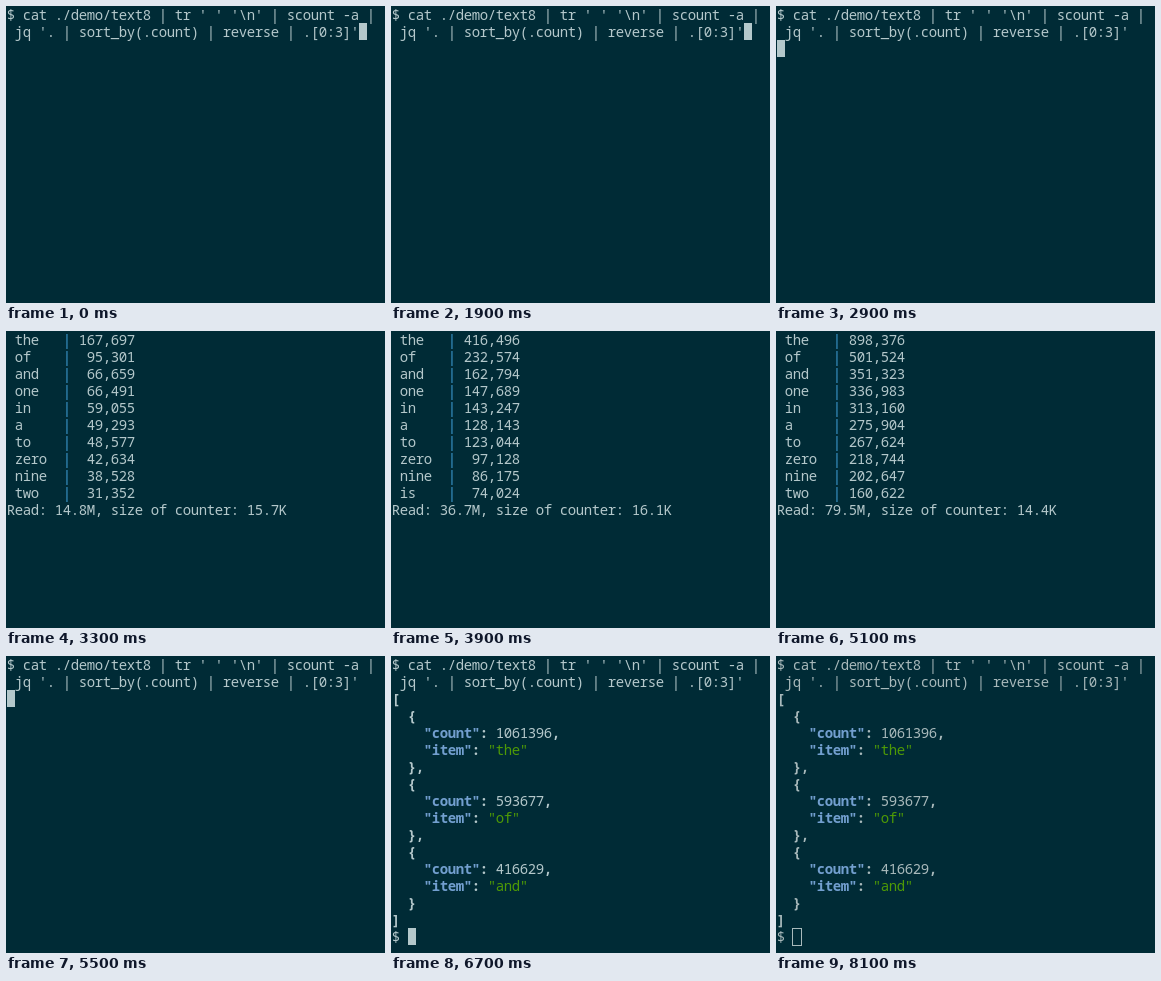
Write an HTML page with a canvas that moves like this. It is 379 by 297 pixels and loops after 8.2 s.

```html
<!DOCTYPE html>
<html lang="en">
<head>
<meta charset="utf-8">
<title>Word counter in a terminal</title>
<style>
  html, body { margin: 0; width: 100%; height: 100%; overflow: hidden; background: #002b36; }
  canvas { display: block; }
</style>
</head>
<body>
<canvas id="screen" width="379" height="297"></canvas>
<script>
const ctx = document.getElementById('screen').getContext('2d');
const LOOP = 8200, CELL_W = 8, CELL_H = 17, LEFT = 1, BASELINE = 14;
const BG = '#002b36', FG = '#b4c8cb', FG_DIM = '#a8b9bb';
const BLUE = '#729fcf', GREEN = '#4e9a06', BAR = '#3f9fd8';

const COMMAND = [
  "$ cat ./demo/text8 | tr ' ' '\\n' | scount -a |",
  " jq '. | sort_by(.count) | reverse | .[0:3]'"
];
const RESULT = [[1061396, 'the'], [593677, 'of'], [416629, 'and']];

// Values at each of KEY_TIMES; linear in between.
const KEY_TIMES = [2900, 3300, 3900, 4700, 5500];
const COUNTS = {
  the:  [0, 167697, 416496, 735355, 1061396],
  of:   [0, 95301, 232574, 409370, 593677],
  and:  [0, 66659, 162794, 286017, 416629],
  one:  [0, 66491, 147689, 262201, 411764],
  in:   [0, 59055, 143247, 254119, 372201],
  a:    [0, 49293, 128143, 225934, 325873],
  to:   [0, 48577, 123044, 218872, 316376],
  zero: [0, 42634, 97128, 172512, 264975],
  nine: [0, 38528, 86175, 154863, 250430],
  two:  [0, 31352, 73300, 128600, 192644],
  is:   [0, 30300, 74024, 129400, 183153]
};
const MEGS_READ = [0.2, 14.8, 36.7, 65.1, 94];
const COUNTER_SIZE = [14.9, 15.7, 16.1, 13.9, 15];

let foreground = FG;

function valueAt(values, t) {
  let i = 0;
  while (i < KEY_TIMES.length - 2 && t >= KEY_TIMES[i + 1]) i++;
  const part = (t - KEY_TIMES[i]) / (KEY_TIMES[i + 1] - KEY_TIMES[i]);
  return values[i] + (values[i + 1] - values[i]) * part;
}

function print(col, row, text, color = foreground, bold = false) {
  ctx.font = `${bold ? 'bold ' : ''}14px "Noto Sans Mono", "DejaVu Sans Mono", monospace`;
  ctx.fillStyle = color;
  [...text].forEach((char, i) =>
    ctx.fillText(char, LEFT + (col + i + 0.5) * CELL_W, row * CELL_H + BASELINE));
  return col + text.length;
}

function cursor(col, row) {
  ctx.fillStyle = FG;
  ctx.fillRect(LEFT + col * CELL_W, row * CELL_H, CELL_W, CELL_H);
}

function hollowCursor(col, row) {
  ctx.strokeStyle = foreground;
  ctx.lineWidth = 1;
  ctx.strokeRect(LEFT + col * CELL_W - 0.5, row * CELL_H + 0.5, CELL_W + 1, CELL_H);
}

function drawCommand() {
  COMMAND.forEach((line, row) => print(0, row, line));
}

function drawTable(t) {
  Object.entries(COUNTS)
    .map(([word, values]) => [word, Math.round(valueAt(values, t))])
    .sort((a, b) => b[1] - a[1])
    .slice(0, 10)
    .forEach(([word, count], row) => {
      print(1, row, word);
      print(7, row, '|', BAR);
      print(9, row, count.toLocaleString('en-US').padStart(7));
    });
  const read = valueAt(MEGS_READ, t).toFixed(1);
  const size = valueAt(COUNTER_SIZE, t).toFixed(1);
  print(0, 10, `Read: ${read}M, size of counter: ${size}K`);
}

function drawField(row, key, value, color, tail) {
  let col = print(4, row, `"${key}"`, BLUE, true);
  col = print(col, row, ':', foreground, true);
  col = print(col + 1, row, value, color);
  print(col, row, tail, foreground, true);
}

function drawResult() {
  print(0, 2, '[', foreground, true);
  RESULT.forEach(([count, item], i) => {
    const row = 3 + i * 4;
    print(2, row, '{', foreground, true);
    drawField(row + 1, 'count', String(count), foreground, ',');
    drawField(row + 2, 'item', `"${item}"`, GREEN, '');
    print(2, row + 3, i < RESULT.length - 1 ? '},' : '}', foreground, true);
  });
  print(0, 15, ']', foreground, true);
  print(0, 16, '$');
}

const blinkOn = (t, start) => Math.floor((t - start) / 600) % 2 === 0;

function draw(t) {
  foreground = t < 8100 ? FG : FG_DIM;
  ctx.fillStyle = BG;
  ctx.fillRect(0, 0, 379, 297);
  ctx.textAlign = 'center';

  if (t >= 3100 && t < 5500) {
    drawTable(Math.floor((t - 3100) / 200) * 200 + 3100);
    return;
  }
  drawCommand();
  if (t < 2900) {
    if (blinkOn(t, -500)) cursor(44, 1);
  } else if (t < 5700) {
    cursor(0, 2);
  } else {
    drawResult();
    if (t >= 8100) hollowCursor(2, 16);
    else if (blinkOn(t, 5500)) cursor(2, 16);
  }
}

const start = performance.now();
function tick() {
  draw((performance.now() - start) % LOOP);
  requestAnimationFrame(tick);
}
tick();
</script>
</body>
</html>
```
